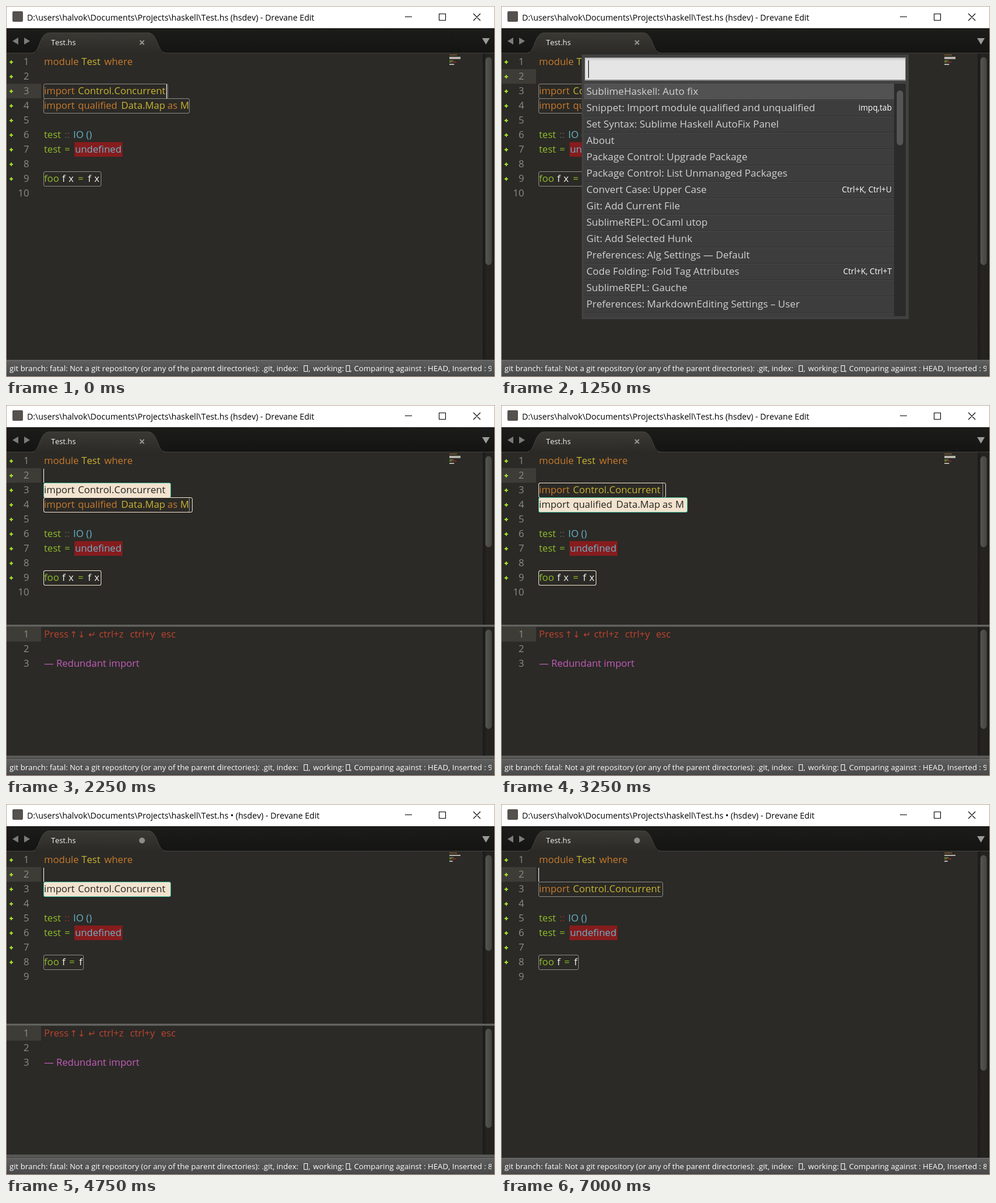
These frames come from a looping animation (836 by 635 pixels, 7.25 s). An HTML page:

```html
<!DOCTYPE html>
<html lang="en">
<head>
<meta charset="utf-8">
<title>Auto fix demo</title>
<style>
  html, body { margin: 0; width: 100%; height: 100%; overflow: hidden; background: #2b2a26; }
  svg { display: block; font-family: "Open Sans", "Noto Sans", sans-serif; font-kerning: none; }
  text { white-space: pre; }
  .code { font-size: 16.6px; }
  .row { font-size: 17px; fill: #d2d2d2; }
  .row .hit { font-weight: 700; fill: #f4f4f4; }
</style>
</head>
<body>
<svg width="836" height="635" viewBox="0 0 836 635">
  <defs>
    <linearGradient id="bar" x2="0" y2="1"><stop stop-color="#1c1c1a"/><stop offset="1" stop-color="#141412"/></linearGradient>
    <linearGradient id="tab" x2="0" y2="1"><stop stop-color="#3a3934"/><stop offset="1" stop-color="#2b2a26"/></linearGradient>
    <linearGradient id="status" x2="0" y2="1"><stop stop-color="#5f5f5f"/><stop offset="1" stop-color="#484848"/></linearGradient>
    <linearGradient id="track"><stop stop-color="#1b1a18"/><stop offset=".35" stop-color="#252421"/><stop offset="1" stop-color="#22211e"/></linearGradient>
    <linearGradient id="thumb"><stop stop-color="#555552"/><stop offset="1" stop-color="#444441"/></linearGradient>
    <linearGradient id="field" x2="0" y2="1"><stop stop-color="#c4c4c4"/><stop offset=".15" stop-color="#e5e5e5"/></linearGradient>
    <clipPath id="statusClip"><rect x="0" y="605" width="830" height="30"/></clipPath>
    <clipPath id="listClip"><rect x="142" y="133" width="530" height="399"/></clipPath>
  </defs>
  <g id="scene"></g>
</svg>
<script>
const LOOP = 7250;

// Each step changes only the listed parts of the state.
const steps = [
  [0, { line: 3, caret: 1, query: null, panel: 0, pick: null, fixed: '' }],
  [250, { caret: 0 }],
  [500, { caret: 1 }],
  [750, { line: 2 }],
  [1000, { caret: 0 }],
  [1250, { query: '' }],
  [1750, { query: 'au' }],
  [2000, { query: null, caret: 1 }],
  [2250, { panel: 1, pick: 'thread' }],
  [2750, { caret: 0 }],
  [3000, { caret: 1, pick: 'map' }],
  [3250, { caret: 0 }],
  [3500, { caret: 1, pick: 'foo' }],
  [3750, { caret: 0 }],
  [4000, { caret: 1, pick: 'map', fixed: 'foo' }],
  [4250, { caret: 0 }],
  [4750, { caret: 1, pick: 'thread', fixed: 'foo map' }],
  [5000, { caret: 0 }],
  [5250, { caret: 1 }],
  [5500, { panel: 0, pick: null }],
  [6000, { caret: 0 }],
  [6500, { caret: 1 }],
  [6750, { caret: 0 }],
  [7000, { caret: 1 }]
];
const states = [];
for (const [at, change] of steps) states.push({ ...states.at(-1), ...change, at });

const C = {
  back: '#2b2a26', orange: '#c87a2d', yellow: '#c9b432', green: '#8fbc2a', cyan: '#66b4cb',
  white: '#f6f6f0', red: '#bd432f', violet: '#c45cbc', dim: '#8d8d86', cream: '#f2e3cf'
};

const commands = [
  ['SublimeHaskell: *Au*to fix'],
  ['Snippet: Import module qualified *a*nd *u*nqualified', 'impq,tab'],
  ['Set Syntax: Sublime Haskell *Au*toFix Panel'],
  ['*A*bo*u*t'],
  ['P*a*ckage Control: *U*pgrade Package'],
  ['P*a*ckage Control: List *U*nmanaged Packages'],
  ['Convert C*a*se: *U*pper Case', 'Ctrl+K, Ctrl+U'],
  ['Git: *A*dd C*u*rrent File'],
  ['SublimeREPL: OC*a*ml *u*top'],
  ['Git: *A*dd Selected H*u*nk'],
  ['Preferences: *A*lg Settings — Defa*u*lt'],
  ['Code Folding: Fold Tag *A*ttrib*u*tes', 'Ctrl+K, Ctrl+T'],
  ['SublimeREPL: G*au*che'],
  ['Preferences: M*a*rkdownEditing Settings – *U*ser'],
  ['Preferences: Settings – Default']
];

const rect = (x, y, w, h, fill, extra = '') =>
  `<rect x="${x}" y="${y}" width="${w}" height="${h}" fill="${fill}" ${extra}/>`;
const text = (x, y, body, fill, size, extra = '') =>
  `<text x="${x}" y="${y}" fill="${fill}" ${size ? `font-size="${size}"` : ''} ${extra}>${body}</text>`;
const path = (d, fill, extra = '') => `<path d="${d}" fill="${fill}" ${extra}/>`;
const code = (x, y, body, fill) => text(x, y, body, fill, 0, 'class="code"');
const frame = (x, y, w, color, fill = 'none') =>
  rect(x + .5, y + .5, w, 25, fill, `rx="2.5" stroke="${color}"`);
const lineTop = n => 83 + 25 * (n - 1);

function titleBar(dirty) {
  const mark = dirty ? ' •' : '';
  return rect(0, 0, 836, 38, '#fff') +
    rect(11, 9, 18, 18, '#55524e', 'rx="2"') +
    text(36, 25, `D:\\users\\halvok\\Documents\\Projects\\haskell\\Test.hs${mark} (hsdev) - Drevane Edit`, '#000', 14.1) +
    path('M682 18.5h12M740.5 13.5h11v11h-11zM799 13l12 12m0-12l-12 12', 'none', 'stroke="#000" stroke-width="1.1"');
}

function tabBar(dirty) {
  const close = dirty
    ? '<circle cx="232.5" cy="62.5" r="5" fill="#8c8c88"/>'
    : path('M229 59l7 7m0-7l-7 7', 'none', 'stroke="#96968f" stroke-width="2"');
  return rect(0, 38, 836, 43, 'url(#bar)') +
    rect(0, 79, 836, 1, '#11110f') + rect(0, 80, 836, 1, '#454440') +
    path('M46 81C58 80 57 46 74 46H243C260 46 258 80 272 81Z', 'url(#tab)') +
    path('M46 80C58 79 57 46 74 46H243C260 46 258 79 272 80', 'none', 'stroke="#4a4944"') +
    path('M21 54v12l-10-6zM31 54v12l10-6z', '#7b7b78') +
    path('M814 55h13l-6.5 11z', '#9a9a97') +
    text(77, 67, 'Test.hs', '#f2f2f2', 12.8) + close;
}

function sourceLines(fixed) {
  const { orange, yellow, green, cyan, white } = C;
  const foo = fixed.includes('foo');
  const lines = [
    { parts: [[65, 'module', orange], [129, 'Test', yellow], [168, 'where', orange]] },
    { parts: [] },
    { id: 'thread', box: 212, wide: 217, parts: [[65, 'import', orange], [123, 'Control.Concurrent', yellow]] },
    { id: 'map', box: 249, wide: 254, parts: [[65, 'import', orange], [123, 'qualified', orange],
      [197, 'Data.Map', yellow], [276, 'as', orange], [298, 'M', yellow]] },
    { parts: [] },
    { parts: [[65, 'test', green], [100, '::', fixed ? '#8f3029' : '#5c5c56'], [115, 'IO', cyan], [137, '()', cyan]] },
    { error: true, parts: [[65, 'test', green], [100, '=', green], [118, 'undefined', cyan]] },
    { parts: [] },
    foo
      ? { id: 'foo', box: 68, wide: 68, parts: [[65, 'foo', green], [96, 'f', white], [108, '=', green], [125, 'f', white]] }
      : { id: 'foo', box: 98, wide: 98, parts: [[65, 'foo', green], [96, 'f', white], [107, 'x', white],
        [123, '=', green], [140, 'f', white], [151, 'x', white]] },
    { parts: [] }
  ];
  return lines.filter(l => l.id !== 'map' || !fixed.includes('map'));
}

const lineNumber = (n, y) => text(39.5, y, n, C.dim, 0, 'class="code" text-anchor="end"');

function editor(s) {
  const lines = sourceLines(s.fixed);
  let out = rect(1, lineTop(s.line), 59, 25, '#3e3c37');
  lines.forEach((l, i) => {
    const y = lineTop(i + 1);
    const picked = l.id && l.id === s.pick;
    out += lineNumber(i + 1, y + 18);
    if (i < lines.length - 1) out += path(`M6 ${y + 13}h6m-3-3v6`, 'none', 'stroke="#a2dc2c" stroke-width="2"');
    if (l.error) out += rect(117, y, 82, 25, '#861c1d');
    if (l.id) {
      out += frame(64, y, l.box, '#8c8b87');
      if (s.panel && !s.fixed.includes(l.id)) {
        out += picked ? frame(64, y, l.wide, '#3cbfa0', C.cream) : frame(64, y, l.wide, C.cream);
      }
    }
    for (const [x, body, color] of l.parts) out += code(x, y + 18, body, picked ? '#25241f' : color);
  });
  if (s.caret && s.query === null) {
    out += rect(s.line === 3 ? 274 : 64, lineTop(s.line) + 1, 1, 24, '#fff');
  }
  return out + minimap(lines);
}

function minimap(lines) {
  return lines.map((l, i) => {
    const y = 83 + 2 * i;
    if (!l.parts.length) return '';
    if (l.id) return rect(758, y, l.id === 'foo' ? l.box / 12 : 19, 1.8, '#c6c2b8');
    if (l.error) return rect(758, y, 4, 1.5, '#73902a') + rect(763, y, 7, 1.8, '#8b2a2a');
    return rect(758, y, i ? 7 : 13, 1.4, i ? '#6d8b46' : '#8a622f');
  }).join('');
}

function scrollbar(top, bottom, thumbTop, thumbHeight) {
  return rect(815, top, 20, bottom - top, 'url(#track)') +
    rect(820, thumbTop, 10, thumbHeight, 'url(#thumb)', 'rx="5" stroke="#5c5c59" stroke-width=".6"');
}

function fixPanel(s) {
  const message = s.pick === 'foo' ? 'Eta reduce' : 'Redundant import';
  const arrow = (x, sign) => text(x, 398, sign, C.red, 15, 'text-anchor="middle" font-family="DejaVu Sans, sans-serif"');
  let out = rect(0, 376, 836, 229, C.back) + rect(0, 376, 836, 4, '#62625f') + rect(0, 379, 836, 1, '#454542') +
    rect(1, 380, 59, 25, '#3e3c37');
  for (let n = 1; n <= 3; n++) out += lineNumber(n, 373 + 25 * n);
  return out +
    code(65, 398, 'Press', C.red) + arrow(115.5, '↑') + arrow(129, '↓') + arrow(147, '↵') +
    code(159, 398, 'ctrl+z', C.red) + code(212, 398, 'ctrl+y', C.red) + code(265, 398, 'esc', C.red) +
    code(65, 448, `— ${message}`, C.violet) +
    scrollbar(380, 600, 385, 169) +
    rect(0, 600, 836, 5, '#585856');
}

function statusBar(count) {
  const label = (x, body) => text(x, 625, body, '#fff', 13.2);
  const blank = x => rect(x + .5, 615.5, 6, 10, 'none', 'stroke="#fff"');
  return rect(0, 605, 836, 30, 'url(#status)') + rect(0, 605, 836, 1, '#3b3b39') + rect(0, 606, 836, 1, '#777775') +
    '<g clip-path="url(#statusClip)">' +
    label(6, 'git branch: fatal: Not a git repository (or any of the parent directories): .git, index:') + blank(509) +
    label(517, ',') + label(525, 'working:') + blank(581) + label(588, ',') +
    label(595, `Comparing against : HEAD, Inserted : ${count}`) + '</g>';
}

function palette(query) {
  const rows = commands.map(([name, keys], i) => {
    const y = 133 + 28 * i;
    const body = name.replace(/\*(.+?)\*/g, query ? '<tspan class="hit">$1</tspan>' : '$1');
    return rect(142, y, 530, 28, i ? '#3d3d3d' : '#525252') +
      rect(142, y, 530, 1, i ? '#484848' : '#585858') + rect(142, y + 27, 530, 1, '#303030') +
      `<text class="row" x="146" y="${y + 18.5}">${body}</text>` +
      (keys ? text(668, y + 18, keys, '#fff', 13.6, 'text-anchor="end"') : '');
  }).join('');
  return rect(138, 83, 559, 453, '#414141') +
    rect(143.5, 88.5, 548, 38, 'url(#field)', 'stroke="#8a8a8a"') +
    rect(143, 127, 549, 1, '#858585') +
    text(149, 117, query, '#222', 21) +
    rect(149 + 12.4 * query.length, 93, 1.2, 30, '#111') +
    `<g clip-path="url(#listClip)">${rows}</g>` +
    rect(672, 133, 20, 398, '#2b2b2b') +
    rect(677, 145, 10, 93, '#555', 'rx="5" stroke="#656565" stroke-width=".6"');
}

function draw(s) {
  const dirty = s.fixed !== '';
  const short = s.fixed.includes('map');
  const thumb = s.panel ? (short ? 163 : 155) : (short ? 368 : 355);
  return rect(0, 0, 836, 635, C.back) + titleBar(dirty) + tabBar(dirty) + editor(s) +
    scrollbar(81, s.panel ? 376 : 605, 88, thumb) +
    (s.panel ? fixPanel(s) : '') +
    statusBar(short ? 8 : 9) +
    (s.query === null ? '' : palette(s.query)) +
    rect(.5, .5, 835, 634, 'none', 'stroke="#bda798"');
}

const scene = document.getElementById('scene');
const start = performance.now();
let shown = null;

function tick() {
  const t = Math.max(0, performance.now() - start) % LOOP;
  const state = states.findLast(s => s.at <= t);
  if (state !== shown) scene.innerHTML = draw(shown = state);
  requestAnimationFrame(tick);
}
tick();
</script>
</body>
</html>
```
